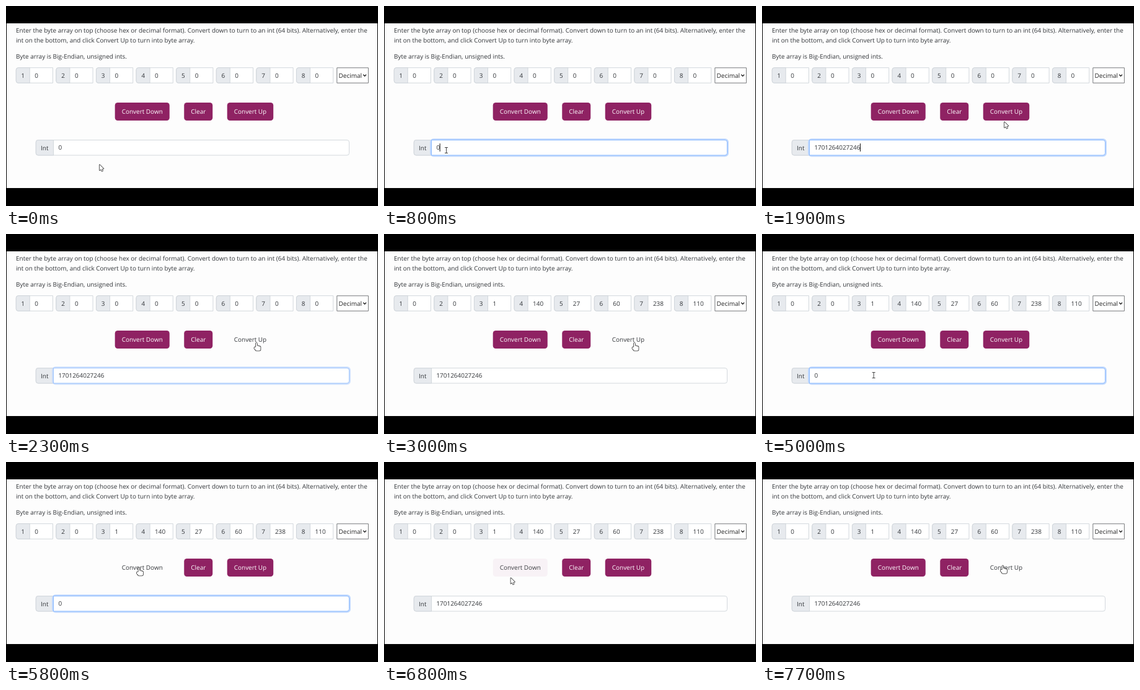
Recreate the animation shown at these times as an HTML page with a canvas. Size 600 by 323 pixels, loop 8000 ms.

```html
<!DOCTYPE html>
<html lang="en">
<head>
<meta charset="utf-8">
<title>Byte array converter</title>
<style>
  html, body { margin: 0; width: 100%; height: 100%; overflow: hidden; background: #000; }
  canvas { display: block; width: 600px; height: 323px; }
</style>
</head>
<body>
<canvas id="stage" width="600" height="323"></canvas>
<script>
const ctx = document.getElementById('stage').getContext('2d');
ctx.font = '9.96px "Open Sans", sans-serif';
ctx.textRendering = 'geometricPrecision';
ctx.lineJoin = 'round';

const LOOP = 8000, STEP = 100, FADE = 150;
const NUMBER = 1701264027246;
const INK = '#33363a', BORDER = '#ced4da', LABEL = '#e7eaee', PLUM = '#8f2263';
const FIELD = { x: 76.5, y: 216.5, w: 477, h: 24.5 };

// What the user does in the field, in ms
const FIRST = { focus: 650, select: 900, replace: 1100, blur: 2250 };
const SECOND = { focus: 3450, select: 3700, replace: 4100, blur: 5900 };
const BYTES_READY = 2400, ZERO_TYPED = 4300, CARET_GONE = 4900, INT_READY = 6000;

// Pointer journey: each move glides from the previous place
const move = (from, to, x, y) => ({ from, to, x, y });
const MOVES = [
  move(0, 1, 151, 256),         // resting under the field
  move(200, 700, 100, 233),     // into the field
  move(1150, 1500, 391, 187),   // below Convert Up
  move(1900, 2200, 404, 175.5), // onto it
  move(3000, 3300, 172, 237),   // back to the field
  move(4850, 5400, 214, 188),   // below Convert Down
  move(5500, 5700, 214.5, 170.5),
  move(6730, 6800, 204.5, 187),
  move(6850, 7300, 392, 190),   // below Convert Up again
  move(7400, 7600, 388.5, 167)
];

const smooth = u => { u = Math.min(1, Math.max(0, u)); return u * u * (3 - 2 * u); };
const between = (t, a, b) => t >= a && t < b;
const inside = ({ x, y }, b) => between(x, b.x, b.x + b.w) && between(y, b.y, b.y + b.h);

// Buttons flow from left to right around their text
let flowX = 175.7;
const BUTTONS = ['Convert Down', 'Clear', 'Convert Up'].map(label => {
  const button = { label, x: flowX, y: 156, w: ctx.measureText(label).width + 22, h: 29 };
  flowX += button.w + 23.5;
  return button;
});

function pointerAt(t) {
  let { x, y } = MOVES[0];
  for (const m of MOVES) {
    const u = smooth((t - m.from) / (m.to - m.from));
    x += (m.x - x) * u;
    y += (m.y - y) * u;
  }
  return { x, y };
}

// Hover fades with the share of the recent past spent over the button
function hoverLevel(button, t) {
  const samples = 30;
  let hits = 0;
  for (let i = 0; i < samples; i++) {
    if (inside(pointerAt(t - FADE * i / samples), button)) hits++;
  }
  return smooth(hits / samples);
}

const focusLevel = t => [FIRST, SECOND].reduce((sum, s) =>
  sum + smooth((t - s.focus) / FADE) - smooth((t - s.blur) / FADE), 0);

function text(str, x, y, color = INK, align = 'left') {
  ctx.fillStyle = color;
  ctx.textAlign = align;
  ctx.fillText(str, x, y);
}

function box(x, y, w, h, radius, fill, stroke, line = 1) {
  ctx.beginPath();
  ctx.roundRect(x, y, w, h, radius);
  if (fill) { ctx.fillStyle = fill; ctx.fill(); }
  if (stroke) { ctx.strokeStyle = stroke; ctx.lineWidth = line; ctx.stroke(); }
}

function inputGroup(x, y, w, h, labelWidth, label, labelX, rightRadius) {
  box(x, y, w, h, [3.5, rightRadius, rightRadius, 3.5], '#fff', BORDER, 0.9);
  box(x, y, labelWidth, h, [3.5, 0, 0, 3.5], LABEL, BORDER, 0.9);
  text(label, labelX, y + 16.1);
}

function drawBytes(t) {
  const n = t >= BYTES_READY ? NUMBER : 0;
  for (let i = 0; i < 8; i++) {
    const x = 16.3 + i * 64.6;
    inputGroup(x, 99.7, 59.2, 24.6, 22, String(i + 1), x + 8.3, 0);
    text(String(Math.floor(n / 256 ** (7 - i)) % 256), x + 30, 115.8);
  }
  box(533.8, 99.8, 50.6, 24.5, 0, '#fff', '#77797c');
  text('Decimal', 536.6, 115.8, '#222');
  ctx.beginPath();
  for (const dx of [-2.4, 0, 2.4]) ctx.lineTo(578.6 + dx, 113.2 - Math.abs(dx));
  ctx.strokeStyle = '#222';
  ctx.lineWidth = 1.4;
  ctx.stroke();
}

function drawButtons(t) {
  for (const b of BUTTONS) {
    const hover = hoverLevel(b, t), middle = b.x + b.w / 2;
    ctx.globalAlpha = 1 - hover;
    box(b.x, b.y, b.w, b.h, 4.5, PLUM);
    text(b.label, middle, 174.2, '#fff', 'center');
    ctx.globalAlpha = hover;
    text(b.label, middle, 174.2, INK, 'center');
    ctx.globalAlpha = 1;
  }
}

function fieldValue(t) {
  if (t < FIRST.replace) return '0';
  if (between(t, SECOND.replace, ZERO_TYPED)) return '';
  return between(t, ZERO_TYPED, INT_READY) ? '0' : String(NUMBER);
}

function drawField(t) {
  const { x, y, w, h } = FIELD, value = fieldValue(t), left = 84.4;
  const width = ctx.measureText(value).width;
  const selected = [FIRST, SECOND].some(s => between(t, s.select, s.replace));
  const caret = between(t, FIRST.focus, FIRST.blur) || between(t, SECOND.focus, CARET_GONE);

  inputGroup(48.3, y, x + w - 48.3, h, x - 48.3, 'Int', 56, 3.5);
  ctx.globalAlpha = focusLevel(t);
  box(x - 1, y - 1, w + 2, h + 2, 4.5, null, '#c3dafe', 3);
  box(x, y, w, h, [0, 3.5, 3.5, 0], '#fff', '#86b7fe');
  ctx.globalAlpha = 1;
  if (selected) box(left, 221, width, 15, 0, '#2f63cc');
  text(value, left, 232.4, selected ? '#fff' : INK);
  if (caret && !selected) box(left + width - 0.4, 222, 1, 13, 0, '#111');
}

function shape(path) {
  ctx.strokeStyle = '#333';
  ctx.lineWidth = 1.6;
  ctx.stroke(path);
  ctx.fillStyle = '#fff';
  ctx.fill(path);
}

const ARROW = new Path2D('M0 .3V9.4L2.2 7.5 3.6 10.7 5 10.1 3.7 7 6.5 6.7Z');
const BEAM = new Path2D('M-2-4.5H3M-2 4.5H3M.5-4.5V4.5');
const HAND = new Path2D();
HAND.roundRect(-1.8, 7, 8.3, 6, 2);
HAND.roundRect(-3.6, 7, 3.6, 3.4, 1.5);
for (let i = 0; i < 4; i++) {
  const top = i ? 3.8 + i * 0.7 : 0.2;
  HAND.roundRect(-1 + i * 1.9, top, 1.8, 10 - top, 0.9);
}

function drawPointer(t) {
  const p = pointerAt(t);
  ctx.save();
  ctx.translate(p.x, p.y);
  if (BUTTONS.some(b => inside(p, b))) shape(HAND);
  else if (!inside(p, FIELD)) shape(ARROW);
  else {
    ctx.strokeStyle = '#333';
    ctx.lineWidth = 0.9;
    ctx.stroke(BEAM);
  }
  ctx.restore();
}

function draw(t) {
  ctx.fillStyle = '#000';
  ctx.fillRect(0, 0, 600, 323);
  ctx.fillStyle = '#fdfdfd';
  ctx.fillRect(1, 28, 598, 266);
  text('Enter the byte array on top (choose hex or decimal format). Convert down to turn to an int (64 bits). Alternatively, enter the', 16, 43.2);
  text('int on the bottom, and click Convert Up to turn into byte array.', 16, 59);
  text('Byte array is Big-Endian, unsigned ints.', 16, 84.8);
  drawBytes(t);
  drawButtons(t);
  drawField(t);
  drawPointer(t);
}

const start = performance.now();
function tick() {
  const t = (performance.now() - start) % LOOP;
  draw(Math.floor(t / STEP) * STEP);
  requestAnimationFrame(tick);
}
tick();
</script>
</body>
</html>
```
